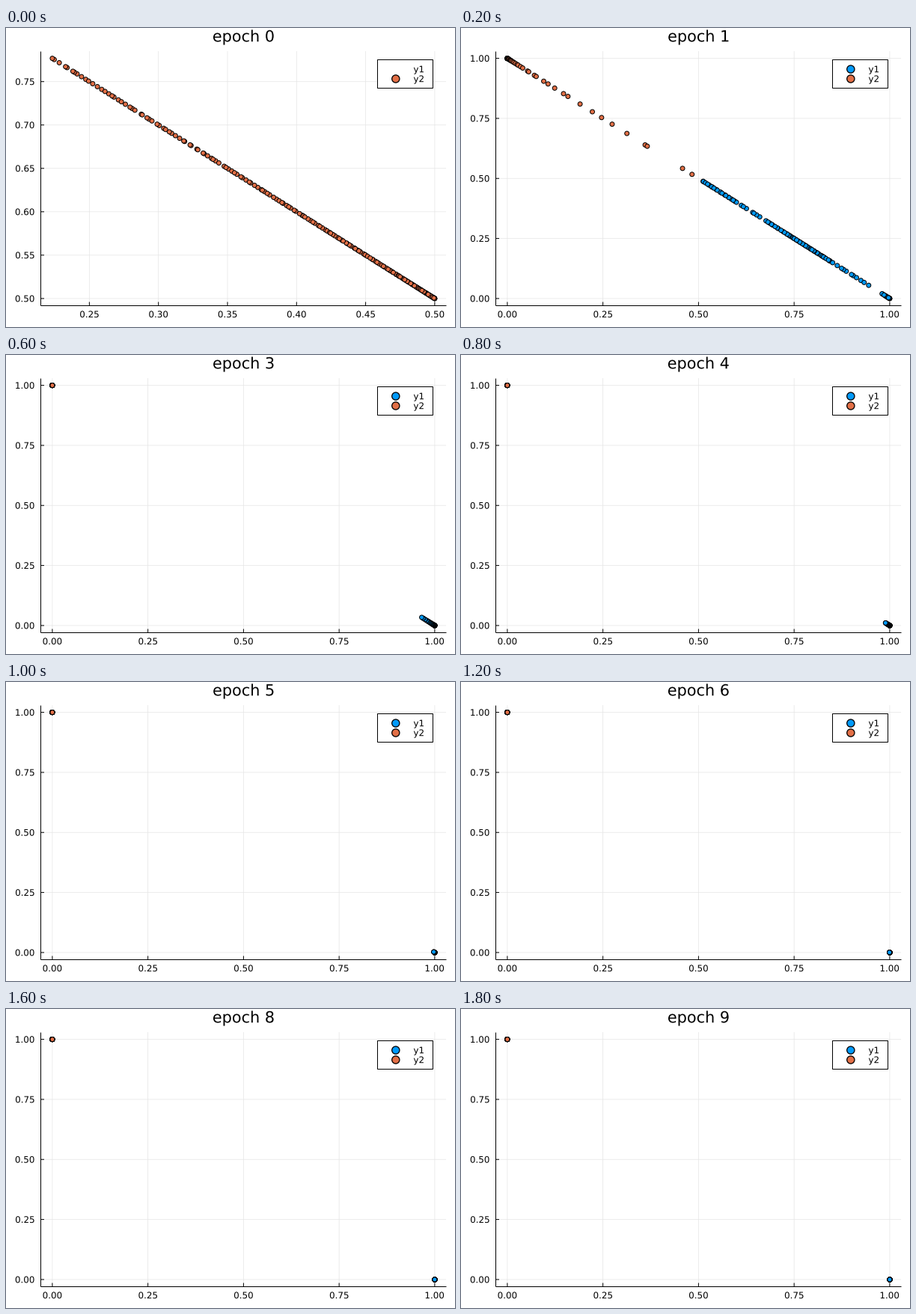
A matplotlib script for the animation above (2000 ms loop, 600 by 400 pixels).

```python
import numpy as np
import matplotlib.pyplot as plt
from matplotlib.animation import FuncAnimation
from matplotlib.patches import Circle, PathPatch, Rectangle
from matplotlib.path import Path
from matplotlib.textpath import TextPath

W, H = 600, 400
EPOCHS = 10
PT = 0.72  # points per pixel at 100 dpi
BLUE, ORANGE = "#009afa", "#e26f46"
GRID = "#e6e6e6"
LEFT, RIGHT, TOP, BOTTOM = 46, 588, 31, 371
X0, X1 = 61.9, 572.9   # smallest and largest data value, across
Y0, Y1 = 40.6, 361.9   # the same two ends of the diagonal, down
FONT = {"family": "DejaVu Sans"}
SMALL, LARGE = 11.9, 20.8

fig = plt.figure(figsize=(W / 100, H / 100), dpi=100, facecolor="white")
ax = fig.add_axes([0, 0, 1, 1])
rng = np.random.default_rng(4)


def ranks(n):
    """Rising values from 0 to 1 with uneven gaps."""
    u = np.arange(n) + rng.random(n)
    return (u - u[0]) / (u[-1] - u[0])


def tail(n, reach, power):
    """Distances that crowd at 0 and thin out towards 'reach'."""
    return reach * ranks(n) ** power


def first_blues():
    """A band of middling scores, and a small knot of certain ones."""
    band = np.interp(ranks(86), [0, 0.22, 0.33, 0.46, 0.72, 0.87, 1],
                     [0.512, 0.595, 0.677, 0.732, 0.798, 0.847, 0.945])
    return rng.permutation(np.concatenate([band, 1 - tail(17, 0.02, 2)]))


def make_points(epoch):
    """Orange and blue positions along the diagonal, from 0 to 1."""
    if epoch == 0:
        return rng.permutation(1 - tail(180, 1, 1.8)), []
    orange = {1: 0.483, 2: 0.444}.get(epoch, 0)
    if epoch == 1:
        return tail(55, orange, 6), first_blues()
    blue = {2: 0.222, 3: 0.034}.get(epoch, 0.011 * 0.24 ** (epoch - 4))
    return tail(40, orange, 9), 1 - tail(60, blue, 5)


POINTS = [make_points(e) for e in range(EPOCHS)]


def place(t):
    return X0 + t * (X1 - X0), Y0 + t * (Y1 - Y0)


def text(s, x, y, size, align):
    """Draw text at baseline y, placed by its inked width."""
    path = TextPath((0, 0), s, size=size, prop=FONT)
    box = path.get_extents()
    anchor = {"left": box.x0, "center": (box.x0 + box.x1) / 2,
              "right": box.x1}[align]
    verts = (path.vertices - [anchor, 0]) * [1, -1] + [x, y]
    ax.add_patch(PathPatch(Path(verts, path.codes), fc="black", lw=0,
                           zorder=6))


def line(xs, ys, color="black", width=1, z=2, snap=False):
    ax.plot(xs, ys, color=color, lw=width * PT, zorder=z, snap=snap,
            solid_capstyle="butt")


def dot(x, y, r, color, width, z):
    ax.add_patch(Circle((x, y), r, fc=color, ec="black", lw=width * PT,
                        zorder=z))


def draw_axes(epoch):
    if epoch == 0:
        lo, hi, ticks = 0.2232, 0.5, np.linspace(0.25, 0.5, 6)
    else:
        lo, hi, ticks = 0, 1, np.linspace(0, 1, 5)
    for v in ticks:
        x, y = place((v - lo) / (hi - lo))
        line([x, x], [TOP, BOTTOM], GRID, 0.75, 1)
        line([LEFT, RIGHT], [y, y], GRID, 0.75, 1)
        line([x, x], [BOTTOM, BOTTOM - 4.5])
        line([LEFT, LEFT + 5], [y, y])
        text(f"{v:.2f}", x, 387.2, SMALL, "center")
        # both coordinates of a point add up to one
        text(f"{1 - v:.2f}", 37.6, y + 4.4, SMALL, "right")
    line([LEFT, LEFT], [TOP, BOTTOM], snap=True)
    line([LEFT, RIGHT], [BOTTOM, BOTTOM], snap=True)


def draw_points(ts, color, z):
    for t in ts:
        dot(*place(t), 2.95, color, 1, z)


def draw_legend(has_blue):
    ax.add_patch(Rectangle((496, 42), 74, 38, fc="white", ec="black",
                           lw=PT, zorder=5))
    if has_blue:
        dot(520.8, 55.1, 5.1, BLUE, 1.3, 6)
    dot(520.8, 68, 5.1, ORANGE, 1.3, 6)
    text("y1", 544.8, 59.3, SMALL, "left")
    text("y2", 544.8, 72.2, SMALL, "left")


def draw(epoch):
    ax.clear()
    ax.set_xlim(0, W)
    ax.set_ylim(H, 0)
    ax.axis("off")
    orange, blue = POINTS[epoch]
    draw_axes(epoch)
    draw_points(blue, BLUE, 3)
    draw_points(orange, ORANGE, 4)
    draw_legend(len(blue) > 0)
    text(f"epoch {epoch}", 317.3, 18.2, LARGE, "center")
    return ax.get_children()


anim = FuncAnimation(fig, draw, frames=EPOCHS, interval=200,
                     repeat=True, repeat_delay=0, blit=False)
plt.show()
```
